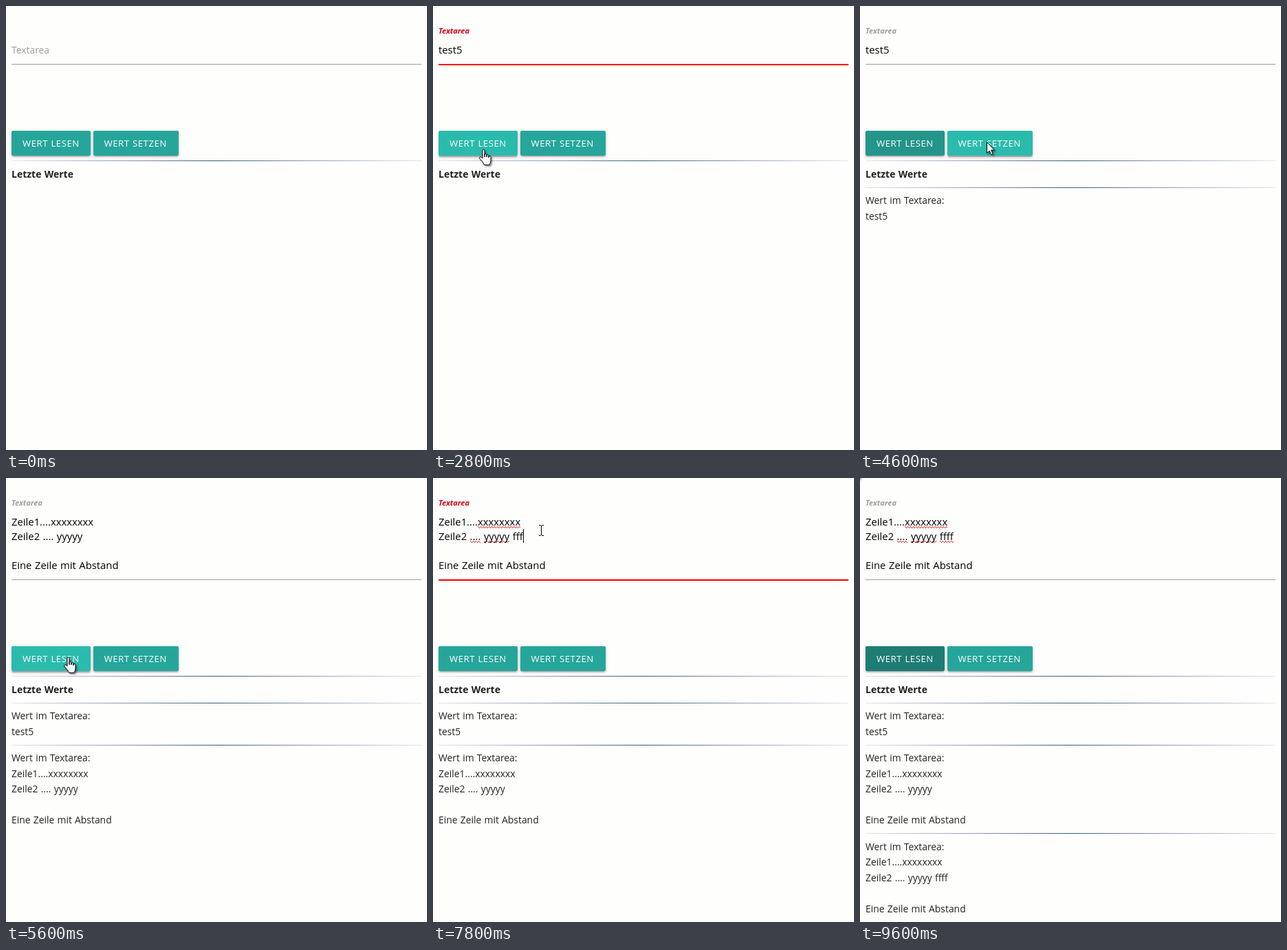
Write an HTML page that moves like this. It is 612 px wide and 644 px high and loops after 9800 ms.

```html
<!DOCTYPE html>
<html lang="de">
<head>
<meta charset="utf-8">
<style>
  html, body { margin: 0; width: 100%; height: 100%; overflow: hidden; background: #fefefd; }
  body { position: relative; font: 13.9px/22.5px "Open Sans", "Noto Sans", sans-serif; word-spacing: .6px; color: rgba(0,0,0,.87); }
  body > *, .btn { position: absolute; }
  pre { margin: 0; font: inherit; }
  #label { left: 8px; top: 52.5px; color: #9e9e9e; }
  #label.up { top: 24.5px; font: italic 700 11px/22.5px "Open Sans", "Noto Sans", sans-serif; }
  #value { left: 8px; top: 53px; font-size: 14.85px; line-height: 21px; color: #000; }
  #value u { --dot: linear-gradient(90deg, #e01818 1px, transparent 0); text-decoration: none;
    background: var(--dot) 0 17px / 4px 1px repeat-x, var(--dot) 1px 18px / 2px 1px repeat-x, var(--dot) 2px 19px / 4px 1px repeat-x; }
  #value i { display: inline-block; width: 1px; height: 20px; margin-right: -1px; background: #000; vertical-align: -4px; }
  #line { left: 8px; width: 596px; }
  #lower { left: 8px; width: 596px; }
  .btn { top: 0; height: 36px; border-radius: 2px; color: #fff; background: #26a69a; padding-left: 16px; box-sizing: border-box;
    font-size: 13.2px; font-weight: 500; line-height: 36px; letter-spacing: .5px; white-space: nowrap;
    box-shadow: 0 2px 2px rgba(0,0,0,.14), 0 3px 1px -2px rgba(0,0,0,.12), 0 1px 5px rgba(0,0,0,.2); }
  .btn.hover { background: #2bbbad; box-shadow: 0 3px 3px rgba(0,0,0,.14), 0 1px 7px rgba(0,0,0,.12), 0 3px 1px -1px rgba(0,0,0,.2); }
  .btn.focus { background: #1d7d74; }
  .btn.fading { background: #24958a; }
  #log { padding-top: 43.4px; }
  #log hr { height: 1px; margin: 0 0 7.5px; border: 0;
    background: linear-gradient(90deg, rgba(60,85,125,.14), #3f587d 50%, rgba(60,85,125,.14)); }
  #log pre { margin-bottom: 7.5px; }
  #log b { font-size: 14px; }
  #popup { left: 14px; top: 15px; width: 197px; height: 35px; border-radius: 7px; background: #2b2b2b; color: #fff;
    font-size: 12.9px; line-height: 36px; box-shadow: 0 4px 9px rgba(0,0,0,.22); }
  #popup span { position: absolute; }
  #mouse { left: 0; top: 0; overflow: visible; filter: drop-shadow(2px 2px 1px rgba(0,0,0,.4)); }
</style>
</head>
<body>
<div id="label">Textarea</div>
<pre id="value"></pre>
<div id="line"></div>
<div id="lower">
  <div class="btn" id="read" style="left:0;width:114.5px">WERT LESEN</div>
  <div class="btn" id="set" style="left:118.5px;width:124px">WERT SETZEN</div>
  <div id="log"></div>
</div>
<div id="popup"><span style="left:19px">tschüss</span><span style="left:91px">Tag</span><span style="left:140px">Telefon</span></div>
<svg id="mouse" width="1" height="1"><path id="shape" stroke="#000"/></svg>
<script>
const STEP = 200, STEPS = 49;
const $ = id => document.getElementById(id);

const shapes = {
  arrow: 'M.5 .5V16.5L4.2 13L6.8 18.7L9.2 17.6L6.7 12H11.5Z',
  hand: 'M-1 13V1.5Q-1 0 .5 0Q2 0 2 1.5V11V7Q4 5.8 5 7.5V11V8Q7 7 8 9V12V9.5Q11 8.5 11 11.5V16Q11 19 9 22.5H1.5Q0 18 -5 13.5Q-6 11.5-4.5 10.7Q-3 10.5-1 13',
  text: 'M-3 -7.5H-1L.5 -6.5L2 -7.5H4M.5 -6.5V6.5M-3 7.5H-1L.5 6.5L2 7.5H4'
};

// step, x, y, pointer shape from this step on
const path = [
  [1, 100, 219, 'arrow'], [4, 68, 65, 'text'], [11, 68, 65, 'text'], [12, 78, 223, 'arrow'],
  [13, 74, 212, 'hand'], [14, 73, 208, 'hand'], [19, 73, 208, 'hand'], [23, 184, 197, 'arrow'],
  [24, 184, 197, 'arrow'], [25, 184, 200, 'arrow'], [27, 90, 260, 'hand'], [30, 90, 260, 'hand'],
  [31, 120, 410, 'arrow'], [33, 157, 76, 'text'], [39, 157, 76, 'text'], [41, 100, 255, 'hand'],
  [42, 100, 253, 'hand'], [44, 100, 253, 'hand'], [45, 75, 190, 'arrow'], [48, -9, -18, 'arrow']
];

const within = (n, from, to) => n >= from && n <= to;
const clamp = (v, lo, hi) => Math.min(hi, Math.max(lo, v));
const lines = (x, dots, y, f) => `Zeile1....${x}\nZeile2 ${dots} ${y} ${f}\n\nEine Zeile mit Abstand`;
const plain = f => lines('xxxxxxxx', '....', 'yyyyy', f);

function valueAt(n) {
  const caret = within(n, 4, 12) || within(n, 34, 42) ? '<i></i>' : '';
  if (n < 24) return 'test5'.slice(0, clamp(n - 6, 0, 5)) + caret;
  const mark = (word, on = n > 35) => on ? `<u>${word}</u>` : word;
  const typed = 'f'.repeat(clamp(n - 36, 0, 4));
  return lines(mark('xxxxxxxx'), mark('....'), mark('yyyyy'), mark(typed, n > 42) + caret);
}

function logAt(n) {
  const entries = ['test5', plain(''), plain('ffff')].slice(0, (n >= 16) + (n >= 28) + (n >= 44));
  return '<hr><pre><b>Letzte Werte</b></pre>' +
    entries.map(e => `<hr><pre>Wert im Textarea:\n${e}</pre>`).join('');
}

function moveMouse(n) {
  $('mouse').style.display = n < 1 ? 'none' : '';
  if (n < 1) return;
  const i = path.findLastIndex(key => key[0] <= n);
  const [at, x, y, kind] = path[i];
  const [end, x2, y2] = path[i + 1] || [at + 1, x, y];
  const k = (n - at) / (end - at);
  $('mouse').style.transform = `translate(${Math.round(x + (x2 - x) * k)}px,${Math.round(y + (y2 - y) * k)}px)`;
  $('mouse').style.filter = kind == 'text' ? 'none' : '';
  $('shape').setAttribute('d', shapes[kind]);
  $('shape').setAttribute('fill', kind == 'text' ? 'none' : '#fff');
}

function render(n) {
  const grown = n >= 24 ? 63 : 0;
  const focused = within(n, 5, 14) || within(n, 35, 42);
  $('label').className = n >= 5 ? 'up' : '';
  $('label').style.color = focused ? '#d90012' : '';
  $('value').innerHTML = valueAt(n);
  Object.assign($('line').style, {
    top: 84 + grown + 'px',
    height: focused ? '2px' : '1px',
    background: n == 42 ? '#a8201f' : focused ? '#f00' : '#9e9e9e'
  });
  $('lower').style.top = 181 + grown + 'px';
  $('read').className = 'btn ' + (
    within(n, 13, 20) || within(n, 27, 30) || within(n, 41, 44) ? 'hover' :
    n == 23 ? 'fading' :
    within(n, 21, 22) || within(n, 31, 34) || n > 44 ? 'focus' : '');
  $('set').className = 'btn ' + (within(n, 22, 23) ? 'hover' : within(n, 24, 27) ? 'focus' : '');
  $('log').innerHTML = logAt(n);
  $('popup').style.display = within(n, 7, 10) ? '' : 'none';
  moveMouse(n);
}

let shown = -1;
function tick() {
  const n = Math.floor(performance.now() / STEP) % STEPS;
  if (n != shown) render(shown = n);
  requestAnimationFrame(tick);
}
tick();
</script>
</body>
</html>
```
